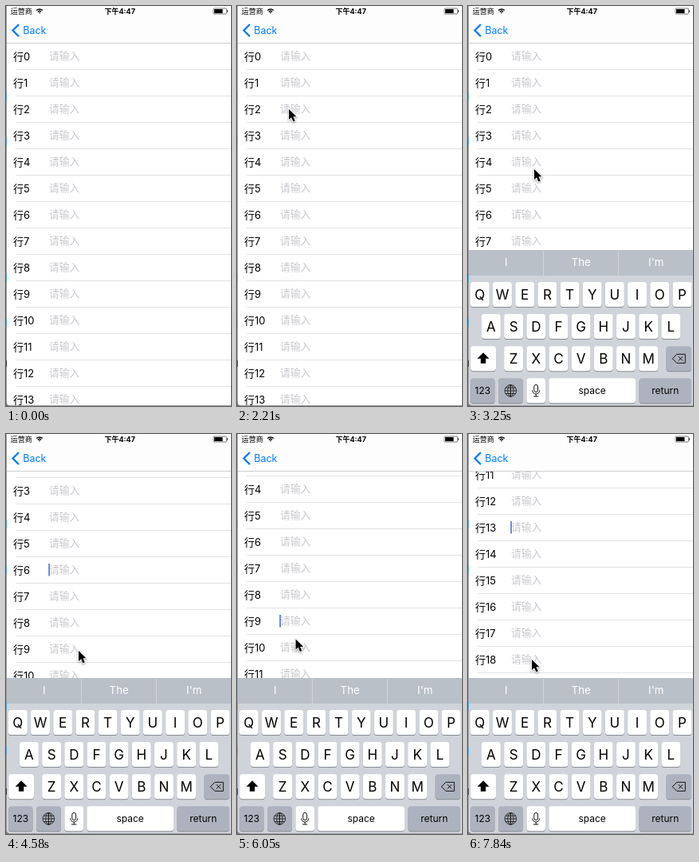
These frames come from a looping animation (282x500 px, 7.99 s). An HTML page with a canvas:

```html
<!DOCTYPE html>
<html lang="zh">
<head>
<meta charset="utf-8">
<title>List with keyboard</title>
<style>
  html, body { margin: 0; width: 100%; height: 100%; overflow: hidden; background: #fff; }
  canvas { display: block; width: 282px; height: 500px; }
</style>
</head>
<body>
<canvas id="stage"></canvas>
<script>
const W = 282, H = 500, LOOP = 7990, STEPS = 54;
const NAV = 46, ROW = 33, ROWS = 20;
const KEYS_TOP = 305, KEYS_HEIGHT = H - KEYS_TOP, PITCH = 28.17, KEY_ROW = 40.1;
const FONT = 'Inter, "Noto Sans CJK SC", "Noto Sans CJK", sans-serif';
const BLUE = '#007aff', INK = '#111';

const canvas = document.getElementById('stage');
const ctx = canvas.getContext('2d');
const ratio = window.devicePixelRatio || 1;
canvas.width = W * ratio;
canvas.height = H * ratio;

const flicks = [
  { from: 24, to: 31, by: 91 },
  { from: 36, to: 37, by: 5 },
  { from: 38, to: 44, by: 114 },
  { from: 49, to: 53, by: 165 },
];
const taps = [{ at: 17, row: 2 }, { at: 23, row: 6 }, { at: 40, row: 9 }, { at: 50, row: 13 }];
const moves = [
  { from: 1, to: 9, x: 84, y: 71 },
  { from: 9, to: 11, x: 24, y: 21 },
  { from: 11, to: 14, x: 65, y: 129 },
  { from: 16, to: 22, x: 83, y: 204 },
  { from: 22, to: 31, x: 91, y: 271 },
  { from: 31, to: 37, x: 75, y: 253 },
  { from: 38, to: 45, x: 68, y: 271 },
  { from: 46, to: 53, x: 80, y: 282 },
];

const progress = (n, { from, to }) => Math.min(1, Math.max(0, (n - from) / (to - from)));
const smooth = p => p * p * (3 - 2 * p);

const scrollAt = n => flicks.reduce((sum, f) => sum + f.by * smooth(progress(n, f)), 0);
const slideAt = n => W * Math.sin(Math.PI * progress(n, { from: 10, to: 15 })) ** 2;
const keyboardOffset = n => KEYS_HEIGHT * (1 - smooth(progress(n, { from: 16, to: 20 })));

function cursorAt(n) {
  return moves.reduce((pos, move) => {
    const p = smooth(progress(n, move));
    return { x: pos.x + (move.x - pos.x) * p, y: pos.y + (move.y - pos.y) * p };
  }, { x: 201, y: 505 });
}

// The caret blinks once a second, restarting with each tap.
function caretRow(n) {
  const tap = taps.filter(t => t.at <= n).pop();
  return tap && (n - tap.at) % 7 < 4 ? tap.row : -1;
}

function rect(x, y, w, h, color) {
  ctx.fillStyle = color;
  ctx.fillRect(x, y, w, h);
}

function text(str, x, y, size, color, align = 'left', weight = 400) {
  ctx.font = `${weight} ${size}px ${FONT}`;
  ctx.textAlign = align;
  ctx.fillStyle = color;
  ctx.fillText(str, x, y);
}

function stroke(color, width) {
  ctx.strokeStyle = color;
  ctx.lineWidth = width;
  ctx.stroke();
}

function fill(color) {
  ctx.fillStyle = color;
  ctx.fill();
}

function path(points, close) {
  ctx.beginPath();
  points.forEach(([x, y]) => ctx.lineTo(x, y));
  if (close) ctx.closePath();
}

function line(x1, y1, x2, y2, width = 1) {
  path([[x1, y1], [x2, y2]]);
  stroke(INK, width);
}

function roundRect(x, y, w, h, r) {
  ctx.beginPath();
  ctx.roundRect(x, y, w, h, r);
}

function at(x, y, paint) {
  ctx.save();
  ctx.translate(x, y);
  paint();
  ctx.restore();
}

function drawList(scroll, focused) {
  for (let i = 0; i < ROWS; i++) {
    const top = NAV + i * ROW - Math.round(scroll);
    text('行' + i, 9, top + 21.7, 13, '#000');
    text('请输入', 54, top + 21.4, 12.8, '#c7c7cd');
    rect(12, top + ROW, W - 12, 1, '#e2e2e4');
    if (i === focused) rect(53.3, top + 9, 1.6, 15.5, '#4470e6');
  }
}

function drawStatus() {
  text('运营商', 5.8, 9.7, 9, '#000');
  for (const r of [1, 3, 5.4]) {
    ctx.beginPath();
    ctx.arc(42, 9.4, r, Math.PI * 1.25, Math.PI * 1.75);
    stroke('#000', 1.3);
  }
  text('下午4:47', 142.7, 9.7, 9, '#000', 'center', 700);
  roundRect(260, 3, 16.5, 7, 1.2);
  stroke('#444', 0.7);
  rect(261, 4, 10.5, 5, '#000');
  rect(277, 5.2, 1, 2.6, '#444');
}

function drawNav(backAlpha) {
  rect(0, 0, W, NAV, '#fdfdfd');
  rect(0, NAV, W, 1, '#cfcfd1');
  drawStatus();
  ctx.globalAlpha = backAlpha;
  path([[16, 23], [8.5, 30.5], [16, 38]]);
  stroke(BLUE, 2.3);
  text('Back', 21.2, 35, 12.5, BLUE);
  ctx.globalAlpha = 1;
}

function key(x, y, w, label, { size = 12, dark = false, icon } = {}) {
  roundRect(x, y + 1, w, 31, 3.6);
  fill('#888c92');
  roundRect(x, y, w, 31, 3.6);
  fill(dark ? '#adb3be' : '#fff');
  text(label, x + w / 2, y + 15.7 + size * 0.36, size, '#000', 'center');
  if (icon) at(x + w / 2, y + 15.6, icon);
}

function shiftIcon() {
  path([[0, -7.5], [7.5, 0], [3.2, 0], [3.2, 6], [-3.2, 6], [-3.2, 0], [-7.5, 0]], true);
  fill('#000');
}

function deleteIcon() {
  path([[-8, 0], [-2.5, -5.5], [8, -5.5], [8, 5.5], [-2.5, 5.5]], true);
  stroke(INK, 1);
  line(-0.5, -2.7, 4.9, 2.7);
  line(4.9, -2.7, -0.5, 2.7);
}

function globeIcon() {
  const r = 7.3;
  for (const rx of [r, r / 2, 0]) {
    ctx.beginPath();
    ctx.ellipse(0, 0, rx, r, 0, 0, Math.PI * 2);
    stroke(INK, 0.8);
  }
  for (const y of [-r / 2, 0, r / 2]) {
    const half = Math.sqrt(r * r - y * y);
    line(-half, y, half, y, 0.8);
  }
}

function micIcon() {
  roundRect(-2.4, -7.5, 4.8, 9.2, 2.4);
  stroke(INK, 1);
  ctx.beginPath();
  ctx.arc(0, -0.5, 4.6, 0, Math.PI);
  stroke(INK, 1);
  line(0, 4.1, 0, 7);
  line(-3.1, 7.1, 3.1, 7.1);
}

function drawKeyboard() {
  rect(0, KEYS_TOP, W, KEYS_HEIGHT, '#d0d4da');
  rect(0, KEYS_TOP, W, 32, '#b9c0c8');
  ['I', 'The', "I'm"].forEach((word, i) => {
    text(word, 47.7 + i * 94, 325, 13.3, '#fff', 'center');
    if (i) rect(i * 94, KEYS_TOP + 1, 1, 31, '#d0d5da');
  });

  const rowY = row => 345 + row * KEY_ROW;
  ['QWERTYUIOP', 'ASDFGHJKL', 'ZXCVBNM'].forEach((letters, row) => {
    const left = 143.8 - letters.length * PITCH / 2;
    [...letters].forEach((c, i) => key(left + i * PITCH, rowY(row), 23.8, c, { size: 17 }));
  });
  key(3.2, rowY(2), 31.8, '', { icon: shiftIcon });
  key(248.5, rowY(2), 31.5, '', { dark: true, icon: deleteIcon });
  key(3.2, rowY(3), 30.3, '123', { dark: true });
  key(38, rowY(3), 30.8, '', { dark: true, icon: globeIcon });
  key(73.4, rowY(3), 23.6, '', { icon: micIcon });
  key(101.3, rowY(3), 108.7, 'space');
  key(214.5, rowY(3), 65.5, 'return', { dark: true });
}

function drawCursor() {
  ctx.scale(0.9, 0.9);
  ctx.shadowColor = 'rgba(0,0,0,.4)';
  ctx.shadowBlur = 2.5 * ratio;
  ctx.shadowOffsetY = ratio;
  path([[0, 0], [0, 14.5], [3.4, 11.4], [6, 17.2], [8.6, 16], [6.1, 10.4], [10.5, 10.2]], true);
  stroke('#fff', 2);
  ctx.shadowColor = 'transparent';
  fill('#000');
}

function drawEdge() {
  rect(0, 0, 1, H, '#98989a');
  for (const y of [108, 164, 335, 391]) rect(0, y, 1, 10, '#4d9bc9');
  rect(0, 443, 1, 8, '#333');
  rect(0, H - 1, W, 1, '#a0a0a2');
  path([[0, 495], [1.5, 498], [5, 500], [0, 500]], true);
  fill('#777');
}

function draw(n) {
  ctx.setTransform(ratio, 0, 0, ratio, 0, 0);
  rect(0, 0, W, H, '#fff');
  const slide = slideAt(n), cursor = cursorAt(n);
  at(slide, 0, () => drawList(scrollAt(n), caretRow(n)));
  drawNav(1 - slide / W);
  at(0, keyboardOffset(n), drawKeyboard);
  drawEdge();
  at(cursor.x, cursor.y, drawCursor);
}

// The picture holds between steps; the small lead keeps changes from coming late.
function tick() {
  const t = performance.now() % LOOP;
  draw(Math.min(STEPS - 1, Math.floor((t + 10) * STEPS / LOOP)));
  requestAnimationFrame(tick);
}
tick();
</script>
</body>
</html>
```
